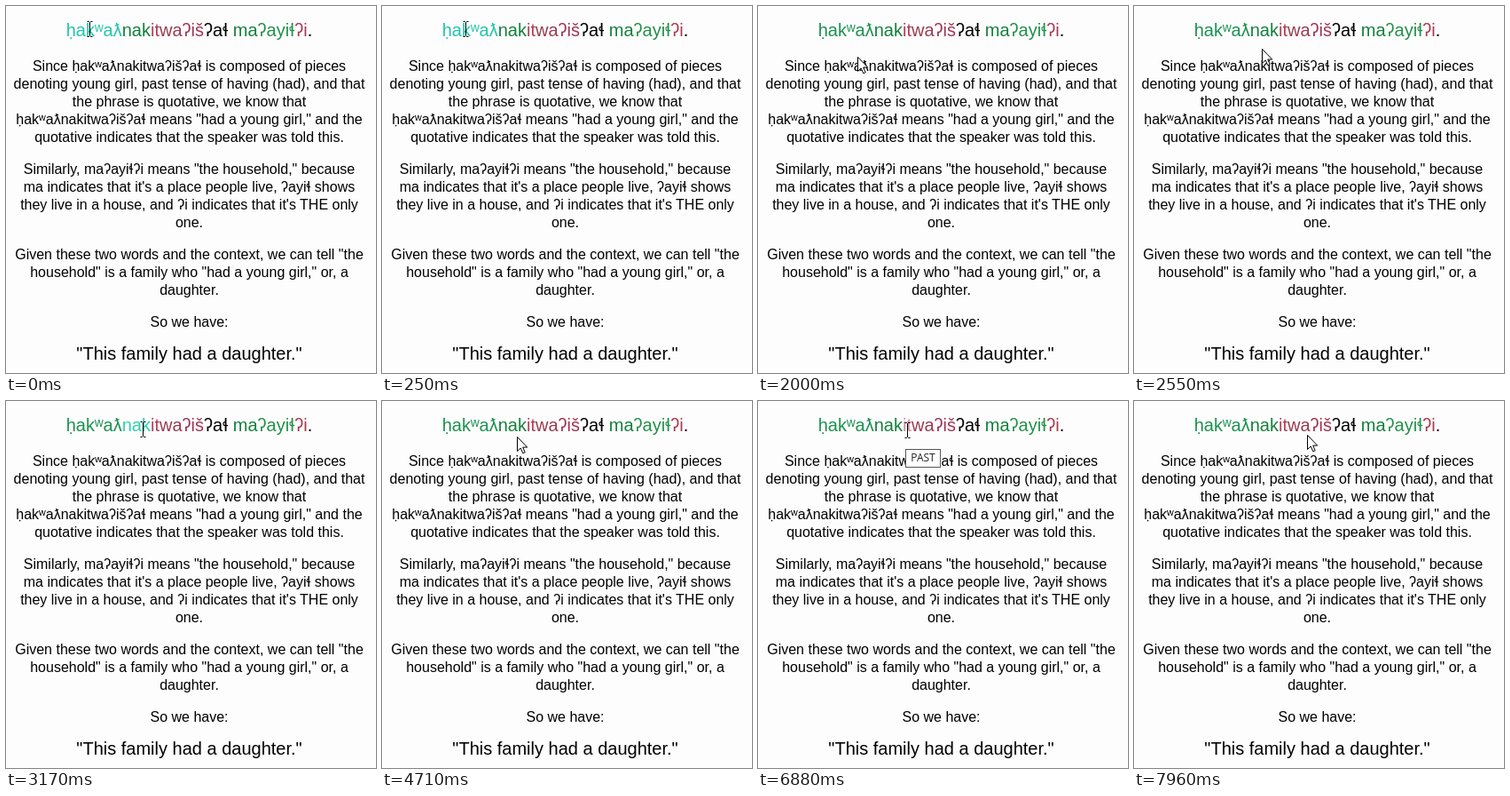
These frames come from a looping animation (417x413 px, 8000 ms). An HTML page:

```html
<!DOCTYPE html>
<html lang="en">
<head>
<meta charset="utf-8">
<style>
html, body { margin: 0; width: 100%; height: 100%; overflow: hidden; background: #fdfdfd; }
svg { display: block; width: 417px; height: 413px; }
text { font: 16px "Liberation Sans", Arial, sans-serif; text-anchor: middle; fill: #000; }
.large { font-size: 20px; }
#tip text { font: 12px "Open Sans", sans-serif; fill: #222; }
</style>
</head>
<body>
<svg viewBox="0 0 417 413">
  <g id="page"></g>
  <g id="tip">
    <rect x=".5" y=".5" height="20" fill="#fff" stroke="#575757"/>
    <text y="14"></text>
  </g>
  <path id="beam" d="M-3 -8.5H-1L0 -7.5L1 -8.5H3M0 -7.5V7.5M-3 8.5H-1L0 7.5L1 8.5H3" fill="none" stroke="#000"/>
  <path id="arrow" d="M.5 .5V16.5L4.2 13L6.8 18.8L9.2 17.7L6.7 12.1H11.7Z" fill="#fff" stroke="#000"/>
</svg>
<script>
const LOOP = 8000, CENTER = 206.5;
const $ = id => document.getElementById(id);

// Word pieces: text, colour, hover colour
const pieces = [
  ["ḥakʷaƛ", "#1c9150", "#22c4aa"],
  ["nak", "#14803c", "#2fd0b0"],
  ["it", "#b03c58", "#d28a94"],
  ["wa", "#983c50"],
  ["ʔiš", "#a03454"],
  ["ʔaɬ ", "#000"],
  ["ma", "#14803c"],
  ["ʔayiɬ", "#229148"],
  ["ʔi", "#a83850"],
  [".", "#000"]
];

const paragraphs = [
  [73, "Since ḥakʷaƛnakitwaʔišʔaɬ is composed of pieces",
    "denoting young girl, past tense of having (had), and that",
    "the phrase is quotative, we know that",
    "ḥakʷaƛnakitwaʔišʔaɬ means \"had a young girl,\" and the",
    "quotative indicates that the speaker was told this."],
  [189, "Similarly, maʔayiɬʔi means \"the household,\" because",
    "ma indicates that it's a place people live, ʔayiɬ shows",
    "they live in a house, and ʔi indicates that it's THE only",
    "one."],
  [285, "Given these two words and the context, we can tell \"the",
    "household\" is a family who \"had a young girl,\" or, a",
    "daughter."],
  [361, "So we have:"]
];

const line = (y, content, cls = "") =>
  `<text x="${CENTER}" y="${y}" class="${cls}">${content}</text>`;

$("page").innerHTML =
  line(34, pieces.map(([s, color]) => `<tspan fill="${color}">${s}</tspan>`).join(""), "large") +
  paragraphs.map(([y, ...lines]) => lines.map((s, i) => line(y + 20 * i, s)).join("")).join("") +
  line(398, "\"This family had a daughter.\"", "large");
const spans = document.querySelectorAll("tspan");

// Pointer stops: time, x, y
const path = [
  [0, 94, 26], [1450, 94, 26], [1700, 112, 57], [2250, 112, 57],
  [2650, 150, 46], [2850, 154, 32], [4400, 154, 32], [4600, 152, 40],
  [5300, 152, 40], [5550, 168, 33], [7150, 168, 33], [7450, 195, 38], [LOOP, 195, 38]
];

// Tooltips: start, end, label, box width
const tips = [
  [600, 1450, "young girl", 67],
  [3850, 4400, "having", 50],
  [6400, 7150, "PAST", 40]
];

function pointerAt(t) {
  const i = path.findIndex(p => p[0] > t);
  const [t0, x0, y0] = path[i - 1], [t1, x1, y1] = path[i];
  const u = (t - t0) / (t1 - t0), e = u * u * (3 - 2 * u);
  return [x0 + (x1 - x0) * e, y0 + (y1 - y0) * e];
}

function show(el, visible, x, y) {
  el.style.display = visible ? "" : "none";
  el.setAttribute("transform", `translate(${Math.round(x)} ${Math.round(y)})`);
}

function render(t) {
  const [x, y] = pointerAt(t);
  const overTitle = y < 36;
  const hovered = !overTitle ? -1 : x < 131 ? 0 : x < 163 ? 1 : x < 173 ? 2 : -1;
  spans.forEach((span, i) => span.setAttribute("fill", pieces[i][i === hovered ? 2 : 1]));

  show($("beam"), overTitle, x, y);
  $("beam").style.translate = ".5px 0";
  show($("arrow"), !overTitle, x, y);

  const tip = tips.find(([start, end]) => t >= start && t < end);
  show($("tip"), tip, x - 2, y + 21);
  if (tip) {
    const [rect, label] = $("tip").children;
    rect.setAttribute("width", tip[3] - 1);
    label.setAttribute("x", tip[3] / 2);
    label.textContent = tip[2];
  }
}

const begin = performance.now();
function tick() {
  render((performance.now() - begin) % LOOP);
  requestAnimationFrame(tick);
}
tick();
</script>
</body>
</html>
```
